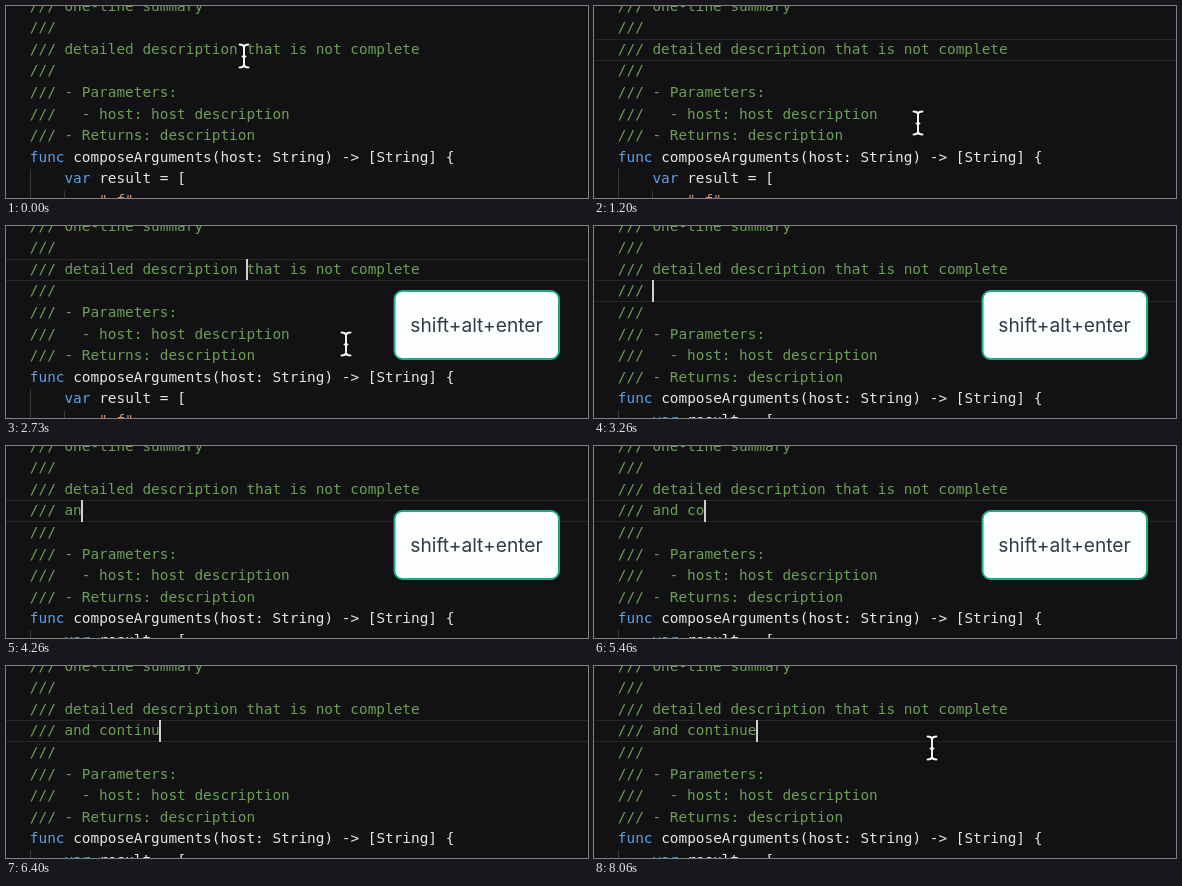
An HTML page with a canvas that plays this animation: 582x192 px, repeating every 8.13 s.

```html
<!DOCTYPE html>
<html lang="en">
<head>
<meta charset="utf-8">
<title>Doc comment editing</title>
<style>
  html, body { margin: 0; width: 100%; height: 100%; overflow: hidden; background: #121214; }
  canvas { display: block; }
</style>
</head>
<body>
<canvas id="stage" width="582" height="192"></canvas>
<script>
const ctx = document.getElementById('stage').getContext('2d');
const W = 582, H = 192, LOOP = 8130;
const LEFT = 23.8, COL = 8.67, ROW = 21.6, BASE = 47.8, ROW_TOP = 33;
const CODE_FONT = '14.4px "DejaVu Sans Mono", monospace';
const GREEN = '#69a053', BLUE = '#5ba3e6', WHITE = '#e6e6e4', ORANGE = '#d09070';

// Row 0 is the "detailed description" line.
const above = ['/// one-line summary', '///', '/// detailed description that is not complete'];
const below = [
  [[GREEN, '///']],
  [[GREEN, '/// - Parameters:']],
  [[GREEN, '///   - host: host description']],
  [[GREEN, '/// - Returns: description']],
  [[BLUE, 'func'], [WHITE, ' composeArguments(host: String) -> [String] {']],
  [[BLUE, '    var'], [WHITE, ' result = [']],
  [[ORANGE, '        "-f",']]
];

const CLICK = 460, NEW_LINE = 3260, POPUP_ON = 2730, POPUP_OFF = 6400;
const typed = 'and continue';
const keyTimes = [4000, 4260, 4460, 4930, 5200, 5460, 5730, 5860, 6000, 6130, 6330, 6660];

// Caret visibility switches at each time, beginning hidden.
const blinks = [460, 1000, 1460, 2000, 2460, 2930, 3260, 3800, 4000, 7130, 7660];

// Pointer: time, x, y; each place holds until the next.
const pointer = [
  [0, 238, 50], [860, 250, 60], [930, 278, 83], [1000, 304, 103], [1060, 318, 113],
  [1200, 324, 117], [1260, 330, 118], [1330, 335, 118], [1400, 338, 118], [1460, 340, 118],
  [8060, 338, 82]
];

const countPast = (times, t) => times.filter(at => at <= t).length;

function text(str, col, row, color) {
  ctx.fillStyle = color;
  ctx.fillText(str, LEFT + col * COL, BASE + row * ROW);
}

function drawRow(parts, row) {
  let col = 0;
  for (const [color, str] of parts) {
    text(str, col, row, color);
    col += str.length;
  }
}

function drawGuides(shift) {
  ctx.fillStyle = '#3a3a3c';
  const top = Math.round(ROW_TOP + (6 + shift) * ROW);
  ctx.fillRect(24, top, 1, H - top);
  ctx.fillRect(58, Math.round(top + ROW), 1, H);
}

function drawLineFrame(row) {
  const top = Math.floor(ROW_TOP + row * ROW);
  ctx.fillStyle = '#27272a';
  ctx.fillRect(0, top, W, 1);
  ctx.fillRect(0, top + 21, W, 1);
}

function drawCaret(row, col) {
  const top = Math.floor(ROW_TOP + row * ROW);
  ctx.fillStyle = '#d0d0d0';
  ctx.fillRect(Math.floor(LEFT + col * COL), top, 2, row ? 22 : 21);
}

function drawPopup() {
  ctx.beginPath();
  ctx.roundRect(388.5, 65, 164.5, 68, 8);
  ctx.fillStyle = '#fdfffe';
  ctx.fill();
  ctx.lineWidth = 2;
  ctx.strokeStyle = '#18ad86';
  ctx.stroke();
  ctx.font = '19.2px Inter, sans-serif';
  ctx.textAlign = 'center';
  ctx.fillStyle = '#303a48';
  ctx.fillText('shift+alt+enter', 470.5, 106);
  ctx.textAlign = 'left';
}

function drawPointer(x, y) {
  ctx.save();
  ctx.translate(x, y);
  ctx.lineCap = 'round';
  ctx.beginPath();
  for (const s of [-1, 1]) {
    ctx.moveTo(-4.5, s * 11.5);
    ctx.quadraticCurveTo(-0.5, s * 11.5, 0, s * 9);
    ctx.quadraticCurveTo(0.5, s * 11.5, 4.5, s * 11.5);
  }
  ctx.moveTo(0, -9);
  ctx.lineTo(0, 9);
  ctx.moveTo(-1.5, 0.5);
  ctx.lineTo(1.5, 0.5);
  ctx.lineWidth = 4;
  ctx.strokeStyle = '#0a0a0b';
  ctx.stroke();
  ctx.lineWidth = 2;
  ctx.strokeStyle = '#f2f2f2';
  ctx.stroke();
  ctx.restore();
}

function draw(t) {
  const shift = t >= NEW_LINE ? 1 : 0;
  const keys = countPast(keyTimes, t);
  ctx.fillStyle = '#121214';
  ctx.fillRect(0, 0, W, H);

  if (t >= CLICK) drawLineFrame(shift);
  drawGuides(shift);

  ctx.font = CODE_FONT;
  above.forEach((line, i) => text(line, 0, i - 2, GREEN));
  if (shift) text('/// ' + typed.slice(0, keys), 0, 1, GREEN);
  below.forEach((parts, i) => drawRow(parts, i + 1 + shift));

  if (countPast(blinks, t) % 2) drawCaret(shift, shift ? 4 + keys : 25);
  if (t >= POPUP_ON && t < POPUP_OFF) drawPopup();

  if (t < NEW_LINE || t >= 8060) {
    const [, x, y] = pointer[countPast(pointer.map(p => p[0]), t) - 1];
    drawPointer(x, y);
  }
}

const start = performance.now();
function tick() {
  draw((performance.now() - start) % LOOP);
  requestAnimationFrame(tick);
}
tick();
</script>
</body>
</html>
```
